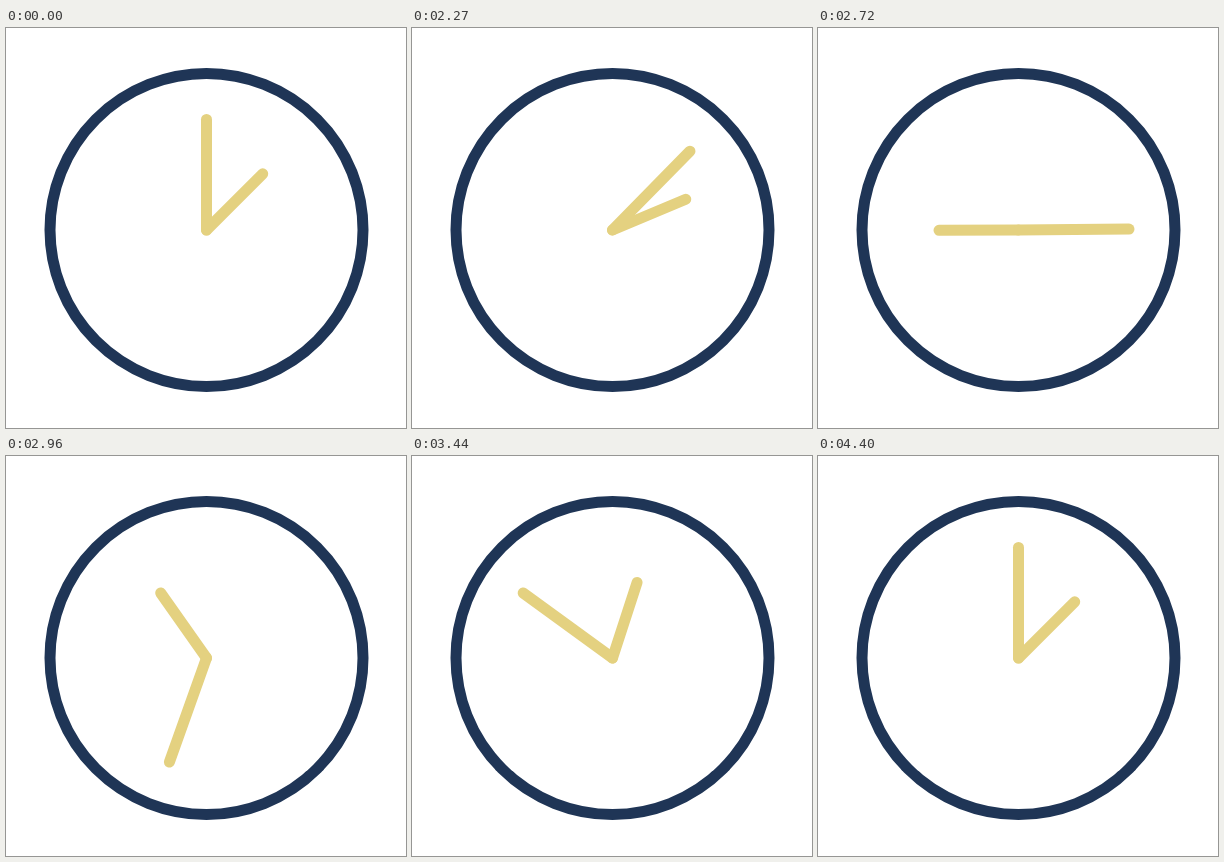
Write an HTML page that moves like this. It is 400x400 px and loops after 4430 ms.

```html
<!DOCTYPE html>
<html lang="en">
<head>
<meta charset="utf-8">
<title>Clock</title>
<style>
  html, body { margin: 0; width: 100%; height: 100%; overflow: hidden; background: #fff; }
  svg { display: block; width: 100%; height: 100%; }
</style>
</head>
<body>
<svg viewBox="0 0 400 400">
  <g transform="translate(200.5 202)" fill="none" stroke-width="11" stroke-linecap="round">
    <circle r="156.5" stroke="#1f3556"/>
    <g stroke="#e4d180">
      <path id="hour" d="M0 0V-79.5"/>
      <path id="minute" d="M0 0V-110.5"/>
    </g>
  </g>
</svg>
<script>
  const LOOP = 4430, START = 2000, SPIN = 2400, STEP = 30;
  const hour = document.getElementById('hour');
  const minute = document.getElementById('minute');

  // cubic-bezier(1/3, 0, 0, 1)
  function ease(x) {
    if (x <= 0) return 0;
    if (x >= 1) return 1;
    let lo = 0, hi = 1;
    for (let i = 0; i < 30; i++) {
      const s = (lo + hi) / 2;
      if (s - 2 * s * s + 2 * s * s * s < x) lo = s; else hi = s;
    }
    return lo * lo * (3 - 2 * lo);
  }

  function turn(hand, angle) {
    hand.setAttribute('transform', `rotate(${angle.toFixed(3)})`);
  }

  function draw(ms) {
    const t = Math.floor((ms % LOOP - START) / STEP) * STEP;
    const p = ease(t / SPIN);
    turn(hour, 45 + 360 * p);
    turn(minute, 720 * p);
  }

  let origin = null;
  function tick(now) {
    if (origin === null) origin = now;
    draw(now - origin);
    requestAnimationFrame(tick);
  }
  draw(0);
  requestAnimationFrame(tick);
</script>
</body>
</html>
```
